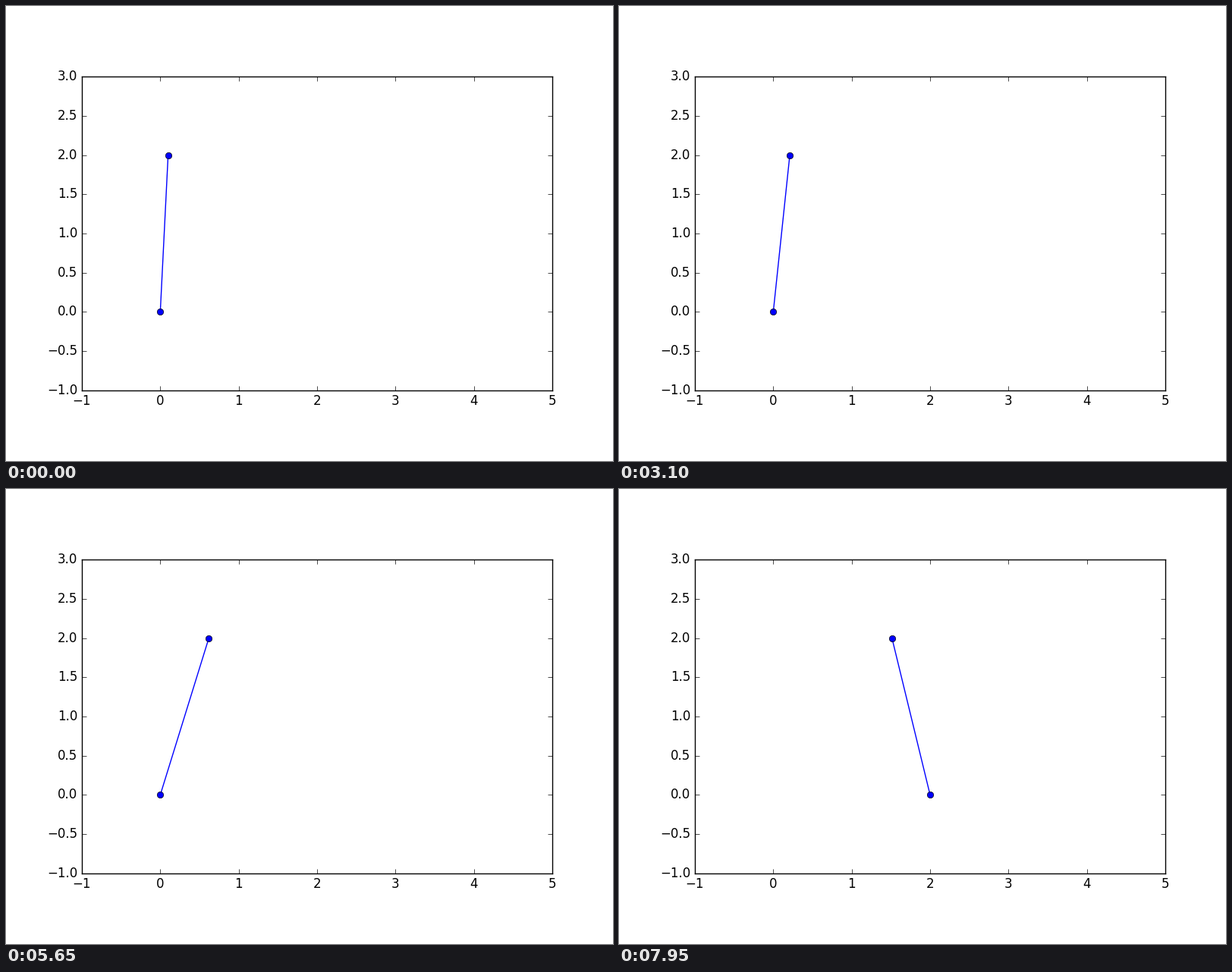
Write a matplotlib script that moves like this. It is 800 px wide and 600 px high and loops after 8000 ms.

```python
import matplotlib.pyplot as plt
import numpy as np
from matplotlib.animation import FuncAnimation

plt.style.use("classic")
plt.rcParams["font.family"] = "DejaVu Sans"

FRAMES, INTERVAL = 160, 50
GRAVITY, HEIGHT, DT = 9.8, 2.0, 0.01
STEP_FRAME, STEP_LENGTH = 139, 2.0


def walk():
    """Linear inverted pendulum that puts its foot forward once."""
    x, v, foot = 0.1, 0.0, 0.0
    path = []
    for k in range(FRAMES):
        if k == STEP_FRAME:
            foot += STEP_LENGTH
        path.append((foot, x))
        x += v * DT + 0.5 * GRAVITY / HEIGHT * (x - foot) * DT**2
        v += GRAVITY / HEIGHT * (x - foot) * DT
    return path


PATH = walk()

fig = plt.figure(figsize=(8, 6), dpi=100, facecolor="white")
ax = fig.add_subplot(111)
ax.set_aspect("equal")
ax.set_xlim(-1, 5)
ax.set_ylim(-1, 3)
ax.set_xticks(np.arange(-1, 6))
ax.set_yticks(np.arange(-1, 3.5, 0.5))
leg, = ax.plot([], [], "o-", color="#0000ff", lw=1, ms=6,
               markeredgecolor="black", markeredgewidth=0.5)


def update(k):
    foot, x = PATH[k]
    leg.set_data([foot, x], [0, HEIGHT])
    return leg,


anim = FuncAnimation(fig, update, frames=FRAMES, interval=INTERVAL,
                     repeat=True, repeat_delay=0, blit=False)
plt.show()
```
